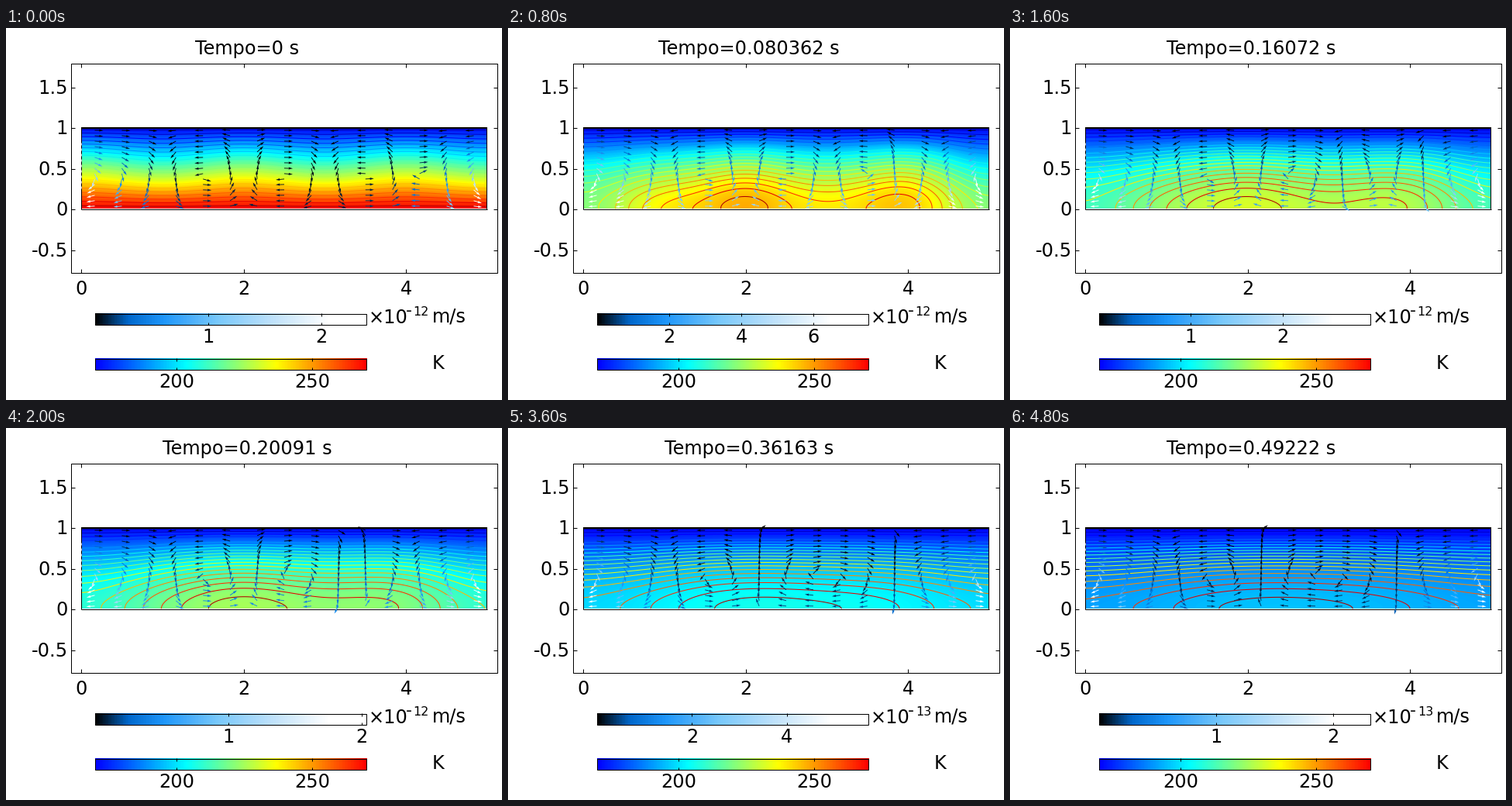
Recreate the animation shown at these times as a matplotlib script. Size 640 px wide and 480 px high, loop 5000 ms.

```python
import math
import numpy as np
import matplotlib.pyplot as plt
from matplotlib.animation import FuncAnimation
from matplotlib.colors import LinearSegmentedColormap
from matplotlib.patches import Rectangle

plt.rcParams["font.family"] = "DejaVu Sans"

FRAMES, INTERVAL = 25, 200
DT = 0.0100453                       # solver output step, s
X0, Y0, UNIT = 97, 233.3, 104.8      # stage position of (0, 0), px per unit

HEAT = LinearSegmentedColormap.from_list(
    "heat", ["#0000ff", "#00ffff", "#ffff00", "#ff0000"])
SPEED = LinearSegmentedColormap.from_list("speed", [
    (0, "#000000"), (0.12, "#0068cc"), (0.25, "#1e96fa"), (0.45, "#78c8fa"),
    (0.65, "#bee1fa"), (0.86, "#ffffff"), (1, "#ffffff")])

# Warm and cold spots on the floor: x, strength, initial spread.
SPOTS = [(0, -0.22, 0.2), (0.95, 0.024, 0.02), (2, 0.095, 0.02),
         (4, 0.085, 0.02), (5, -0.22, 0.2)]


def layer(y, t):
    """Linear profile cooling by conduction above an insulated floor."""
    total = 0
    for m in range(1, 60, 2):
        k = m * math.pi / 2
        total = total + 2 / k**2 * np.cos(k * y) * math.exp(-k * k * t)
    return total


def floor_spots(x, t):
    """Spots that build up, spread like heat kernels and fade."""
    growth = (1 - math.exp(-t / 0.06)) * math.exp(-3.2 * t)
    total = 0
    for center, strength, spread in SPOTS:
        s = spread + 4 * t
        total = total + strength / math.sqrt(s) * np.exp(-(x - center)**2 / s)
    return growth * total


def temperature(x, y, t):
    waves = 0.035 * math.exp(-12 * t) * np.outer(np.sin(np.pi * y), np.cos(np.pi * x))
    spots = np.outer(np.cos(np.pi * y / 2), floor_spots(x, t))
    return np.clip(layer(y, t)[:, None] + spots + waves, 0, 1)


def top_speed(t):
    """Fastest flow in 1e-13 m/s: a burst after the start, then decay."""
    return 17.17 * math.exp(-5.15 * t) / t**0.75 if t else 24


def cell_borders(t):
    """Sinking and rising lines in turn; the middle pair closes up and vanishes."""
    p = min(t / 0.24, 1)
    sinks = [205, 411 + 35 * p**3, 552 - 52 * p**2]
    rises = [306 + 16 * p**4, 516 - 70 * p**2]
    borders = [sinks[0], rises[0], sinks[1], rises[1], sinks[2]]
    if rises[1] - sinks[1] < 20:
        del borders[2:4]
    return (np.array(borders) - X0) / UNIT


def surface_flow(x, borders):
    """Horizontal flow along the top: one arch per cell, skewed at the walls."""
    ends = np.concatenate([[0], borders, [5]])
    flow = np.zeros_like(x)
    for i, (a, b) in enumerate(zip(ends[:-1], ends[1:])):
        s = np.clip((x - a) / (b - a), 0, 1)
        if i == 0:
            s = s**0.25
        elif i == len(ends) - 2:
            s = 1 - (1 - s)**0.25
        flow = np.where((x >= a) & (x < b), (-1)**i * np.sin(np.pi * s), flow)
    return flow


def label(x, y, s, ha="center", px=24):
    ax.text(x, y, s, ha=ha, va="baseline", fontsize=px * 0.72)


def line(xs, ys, color="black", width=1, **kw):
    """Line through pixel columns xs and rows ys."""
    ax.plot(xs, np.array(ys) + 1, color=color, lw=width * 0.72,
            solid_capstyle="butt", **kw)


def box(x, y, w, h):
    ax.add_patch(Rectangle((x, y + 1), w, h, fill=False, ec="black", lw=0.72))


def draw_axes():
    box(84, 45, 550, 270)
    for v in (0, 2, 4):
        x = X0 + UNIT * v
        for row in (45, 310):
            line([round(x)] * 2, [row, row + 5])
        label(x + 0.3, 344, str(v))
    for v in (-0.5, 0, 0.5, 1, 1.5):
        y = round(Y0 - UNIT * v)
        for col in (84, 629):
            line([col, col + 5], [y, y])
        label(80, y + 9, f"{v:g}", "right")


def draw_bar(y, cmap, ticks):
    ax.imshow(np.linspace(0, 1, 351)[None], cmap=cmap, aspect="auto",
              extent=(115, 466, y + 15, y))
    box(115, y, 350, 14)
    for x, text in ticks:
        line([x, x], [y - 1, y + 3])
        line([x, x], [y + 11, y + 14])
        label(x, y + 38, text)


def speed_ticks(top):
    """Largest 1-2-5 step that leaves at least two ticks."""
    steps = [m * 10**e for e in range(3) for m in (1, 2, 5)]
    step = max(s for s in steps if 2 * s <= top)
    power = int(math.log10(step) + 1e-9)
    marks = [(115 + 350 * k * step / top, str(k * step // 10**power))
             for k in range(1, int(top / step) + 1)]
    return marks, 13 - power


def draw_field(t):
    x, y = np.linspace(0, 5, 251), np.linspace(0, 1, 61)
    field = temperature(x, y, t)
    ax.imshow(field, cmap=HEAT, vmin=0, vmax=1, origin="lower", aspect="auto",
              interpolation="bilinear",
              extent=(X0, X0 + 5 * UNIT, Y0, Y0 - UNIT))
    levels = field.max() * (np.arange(20) + 0.5) / 20
    ax.contour(X0 + UNIT * x, Y0 - UNIT * y, field, levels=levels,
               colors=plt.cm.jet(np.linspace(0.02, 0.96, 20)), linewidths=0.75)
    for col in (97, 620):
        line([col, col], [128, 233])
    line([97, 621], [233, 233])
    line([97, 621], [128, 128], width=2)
    line([97, 97], [147, 206], "white", dashes=(3, 4), alpha=0.7)


def draw_arrows(t):
    borders = cell_borders(t)
    x = (np.arange(15) + 0.5) / 3
    y = (np.arange(15) + 0.5) / 15
    h = 1e-3
    flow = surface_flow(x, borders)
    slope = (surface_flow(x + h, borders) - surface_flow(x - h, borders)) / (2 * h)
    turn = np.pi * y**0.75           # the return flow hugs the floor
    u = -np.outer(np.cos(turn), flow)
    w = 0.6 / np.pi * np.outer(np.sin(turn), slope)
    size = np.hypot(u, w) + 1e-9
    wall = np.minimum(x, 5 - x)
    stir = 0.03 + 0.9 * math.exp(-10 * t) * (1 - math.exp(-t / 0.04))
    strength = stir + 1.6 * np.exp(-3.2 * wall)
    shade = np.clip(np.outer(1.5 * (1 - y)**1.8, strength), 0, 1)
    gx, gy = np.meshgrid(X0 + UNIT * x, Y0 - UNIT * y)
    ax.quiver(gx, gy, 11 * u / size, -11 * w / size,
              color=SPEED(shade.ravel()), angles="xy", scale_units="xy", scale=1,
              units="xy", width=0.9, headwidth=3.4, headlength=6,
              headaxislength=5.5, zorder=4)


def draw(frame):
    t = frame * 49 // 24 * DT
    ax.clear()
    ax.axis("off")
    label(311, 34, f"Tempo={t:.5g} s")
    draw_field(t)
    draw_arrows(t)
    draw_axes()
    marks, power = speed_ticks(top_speed(t))
    draw_bar(368, SPEED, marks)
    label(468, 381, "×10", "left")
    label(516, 371, "-", "left", 22)
    label(546, 371, str(power), "right", 16)
    label(550, 380, "m/s", "left")
    draw_bar(426, HEAT, [(220, "200"), (395, "250")])
    label(550, 440, "K", "left")
    ax.set_xlim(0, 640)
    ax.set_ylim(480, 0)
    return []


fig = plt.figure(figsize=(6.4, 4.8), dpi=100, facecolor="white")
ax = fig.add_axes([0, 0, 1, 1])
anim = FuncAnimation(fig, draw, frames=FRAMES, interval=INTERVAL,
                     init_func=lambda: [], repeat=True, repeat_delay=0)
plt.show()
```
